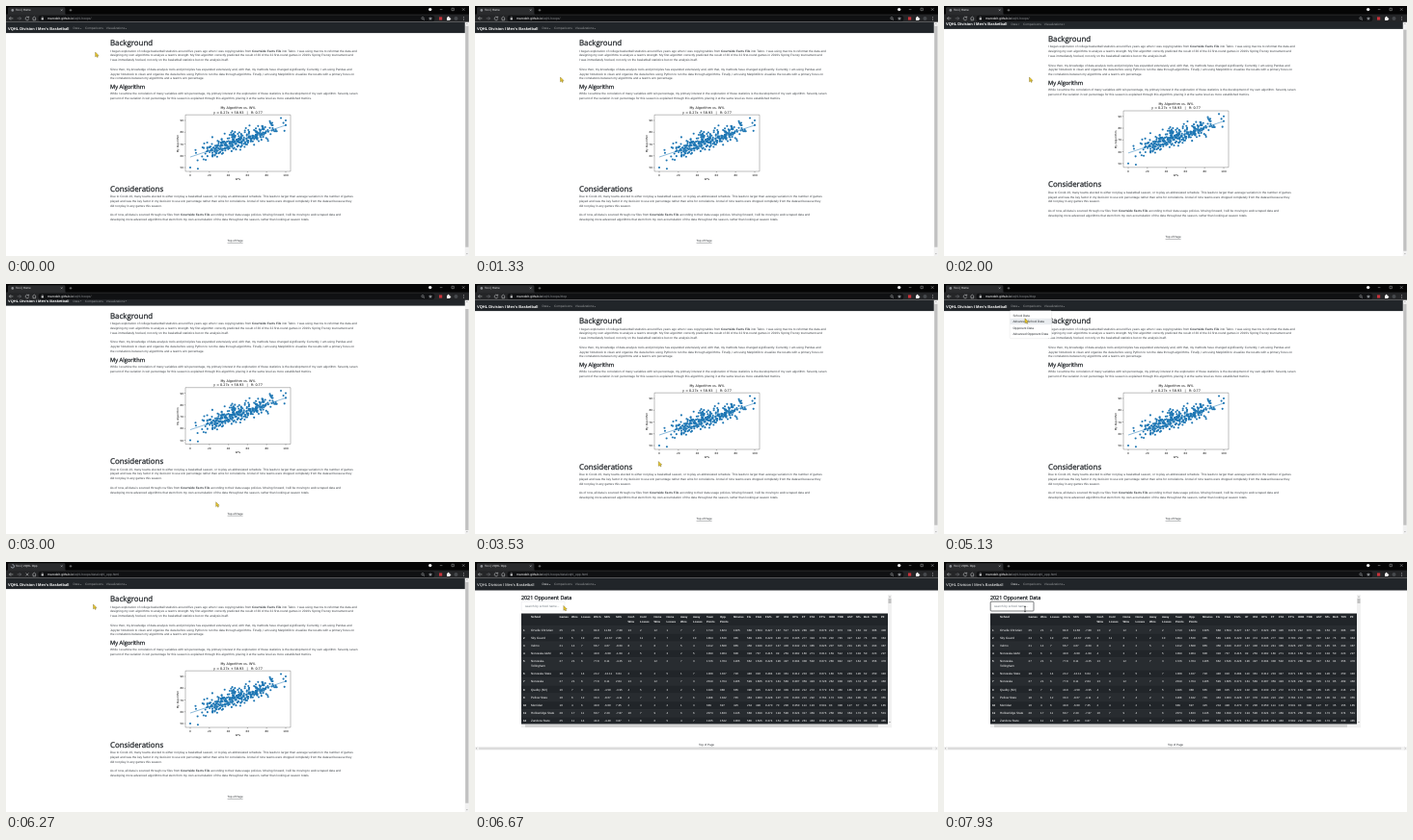
Write an HTML page that moves like this. It is 480 px wide and 260 px high and loops after 8 s.

```html
<!DOCTYPE html>
<html lang="en">
<head>
<meta charset="utf-8">
<title>College basketball statistics</title>
<style>
html, body { margin: 0; width: 100%; height: 100%; overflow: hidden; background: #fff; }
svg { display: block; width: 100vw; height: 100vh; }
text { font-family: "Liberation Sans", Arial, sans-serif; text-rendering: geometricPrecision; white-space: pre; }
.head { font-family: "Open Sans", "Noto Sans", sans-serif; stroke: #212529; stroke-width: .25; }
.plot text { font-family: "DejaVu Sans", sans-serif; }
</style>
</head>
<body>
<svg id="stage" viewBox="0 0 480 260" preserveAspectRatio="none"></svg>
<script>
const LOOP = 8000, INK = '#212529', BODY = '#3a3f44', BLUE = '#1f77b4';

const rect = (x, y, w, h, fill, more = '') =>
  `<rect x="${x}" y="${y}" width="${w}" height="${h}" fill="${fill}" ${more}/>`;
const text = (x, y, size, str, fill = INK, more = '') =>
  `<text x="${x}" y="${y}" font-size="${size}" fill="${fill}" ${more}>${str}</text>`;
const line = (d, color, width = .5, more = '') =>
  `<path d="${d}" fill="none" stroke="${color}" stroke-width="${width}" ${more}/>`;
const triangle = (x, y, r, fill) => `<path d="M${x - r} ${y - r / 2}h${2 * r}l${-r} ${r}z" fill="${fill}"/>`;
const middle = 'text-anchor="middle"', bold = 'font-weight="bold"';

function seeded(seed) {
  return () => (seed = (seed * 16807) % 2147483647) / 2147483647;
}

// ---- Shared page parts

function navbar(height, weight, dataColor) {
  const dim = '#9c9ea0';
  return rect(0, 16.5, 480, height, INK) +
    text(2, 24.6, 4, "VQHL Division I Men's Basketball", '#fff', weight) +
    text(69.5, 24.3, 3.2, 'Data', dataColor || dim) + triangle(77.6, 23.4, .8, dataColor || dim) +
    text(82, 24.3, 3.2, 'Comparisons', dim) +
    text(103.8, 24.3, 3.2, 'Visualizations', dim) + triangle(124.4, 23.4, .8, dim);
}

const topLink = (x, y) => text(x, y, 3, 'Top of Page', INK, middle + ' text-decoration="underline"');

// ---- Home page

const SOURCE = '<tspan font-weight="bold">Courtside Facts File</tspan>';
const PARAGRAPHS = [
  [47.6, `I began exploration of college basketball statistics around five years ago when I was copying tables from ${SOURCE} into Tabro. I was using macros to reformat the data and
designing my own algorithms to analyze a team's strength. My first algorithm correctly predicted the result of 30 of the 32 first-round games in 2019's Spring Frenzy tournament and
I was immediately hooked, not only on the basketball statistics but on the analysis itself.

Since then, my knowledge of data analysis tools and principles has expanded extensively and, with that, my methods have changed significantly. Currently, I am using Pandas and
Jupyter Notebook to clean and organize the data before using Python to run the data through algorithms. Finally, I am using Matplotlib to visualize the results with a primary focus on
the correlations between my algorithms and a team's win percentage.`],
  [92.3, `While I examine the correlation of many variables with win percentage, my primary interest in the exploration of these statistics is the development of my own algorithm. Seventy seven
percent of the variation in win percentage for this season is explained through this algorithm, placing it at the same level as more established metrics.`],
  [199.1, `Due to Covid-19, many teams elected to either not play a basketball season, or to play an abbreviated schedule. This leads to larger than average variation in the number of games
played and was the key factor in my decision to use win percentage rather than wins for correlations. A total of nine teams were dropped completely from the dataset because they
did not play in any games this season.

As of now, all data is sourced through csv files from ${SOURCE} according to their data usage policies. Moving forward, I will be moving to web scraped data and
developing more advanced algorithms that stem from my own accumulation of the data throughout the season, rather than looking at season totals.`],
];

function scatter() {
  const rnd = seeded(4217), normal = () => (rnd() + rnd() + rnd() + rnd() - 2) * 1.73;
  const px = w => 191 + .99 * w, py = v => 168 - 1.225 * (v - 50);
  const fit = w => .27 * w + 58.93;
  const points = [[0, 50], [8, 49], [6, 62.5], [95, 92], [100, 90], [100, 86], [14, 57]];
  while (points.length < 335) {
    const w = 51 + 20 * normal();
    if (w > 5 && w < 99) points.push([w, fit(w) + 3.9 * normal()]);
  }
  let out = points.map(([w, v]) =>
    `<circle cx="${px(w).toFixed(2)}" cy="${py(v).toFixed(2)}" r="1.05" fill="${BLUE}"/>`).join('');
  out += line(`M${px(0)} ${py(fit(0))}L${px(100)} ${py(fit(100))}`, BLUE, .5);
  out += line('M186 113.2h109v58.8h-109z', '#222', .3);
  for (let w = 0; w <= 100; w += 20)
    out += line(`M${px(w)} 172v1.2`, '#000', .3) + text(px(w), 177.2, 2.8, w, '#000', middle);
  for (let v = 50; v <= 90; v += 10)
    out += line(`M186 ${py(v)}h-1.2`, '#000', .3) + text(184, py(v) + 1, 2.8, v, '#000', 'text-anchor="end"');
  out += text(240.5, 107, 3.4, 'My Algorithm vs. W%', '#000', middle) +
    text(240.5, 111.6, 3.4, 'y = 0.27x + 58.93\u00a0\u00a0 |\u00a0\u00a0 R: 0.77', '#000', middle) +
    text(240.5, 181.2, 2.8, 'W%', '#000', middle) +
    text(0, 0, 2.8, 'My Algorithm', '#000', middle + ' transform="translate(178.6 143)rotate(-90)"');
  return `<g class="plot">${out}</g>`;
}

function homePage() {
  const body = PARAGRAPHS.map(([y, block]) =>
    block.split('\n').map((row, i) => text(108, y + 4.8 * i, 3.18, row, BODY)).join('')).join('');
  return navbar(11.6, bold) +
    text(108, 41.2, 7.9, 'Background', INK, 'class="head"') +
    text(108, 86.2, 5.75, 'My Algorithm', INK, 'class="head"') +
    text(108, 192.6, 7.9, 'Considerations', INK, 'class="head"') +
    body + scatter() + topLink(237.6, 245.4);
}

// ---- Table page

const COLUMNS = ('Games,Wins,Losses,W/L%,SRS,SOS,Conf. Wins,Conf. Losses,Home Wins,Home Losses,Away Wins,Away Losses,' +
  'Team Points,Opp. Points,Minutes,FG,FGA,FG%,3P,3PA,3P%,FT,FTA,FT%,ORB,TRB,AST,STL,BLK,TOV,PF').split(',');
const COLUMN_X = [87.5, 100, 110, 123, 134, 146, 158.5, 171, 185.5, 198.5, 213, 226, 240, 254, 268,
  282, 291, 301, 312, 320, 329, 339, 347, 357, 367, 376, 386, 395, 403, 411.5, 421];
const SCHOOLS = [
  ['Orvelle Christian', 21, 4], ['Sky Guard', 5, 19], ['Velmo', 14, 7], ['Norvaska A&amp;M', 6, 9],
  ['Norvaska-/Tollingham', 21, 6], ['Norvaska State', 4, 14], ['Norvaska', 21, 6], ['Quelby (NV)', 7, 9],
  ['Pellow State', 6, 12], ['Merridan', 4, 6], ['Hollowridge State', 17, 11], ['Zandora State', 11, 14],
];

function seasonStats(w, l, rnd) {
  const g = w + l, share = (n, part) => Math.round(n * part);
  const total = perGame => Math.round(g * perGame * (.88 + .24 * rnd()));
  const pair = (rate, tries) => {
    const made = total(rate), shot = total(tries);
    return [made, shot, (made / shot).toFixed(3)];
  };
  return [g, w, l, (100 * w / g).toFixed(1), (40 * (w / g - .55)).toFixed(2), (16 * rnd() - 8).toFixed(2),
    share(w, .6), share(l, .6), share(w, .55), share(l, .35), share(w, .35), share(l, .5),
    total(71), total(68), g * 40 + 25 * share(1, rnd()), ...pair(24, 56), ...pair(6.5, 19.5), ...pair(12.5, 18),
    ...[9.5, 33, 12.5, 6.5, 3.3, 14, 18].map(total)];
}

function schoolTable() {
  const rnd = seeded(991);
  let out = rect(48, 53.5, 380, 115, INK) + text(58, 58.2, 3, 'School', '#fff', bold), y = 66.4;
  COLUMNS.forEach((name, i) => name.split(' ').forEach((word, k) => {
    out += text(COLUMN_X[i], 58.2 + 4.6 * k, 2.8, word, '#fff', bold);
  }));
  SCHOOLS.forEach(([name, w, l], i) => {
    const parts = name.split('/'), h = 8.2 + 4.6 * (parts.length - 1), base = y + 5.1;
    out += rect(48, y, 380, Math.min(h, 168.5 - y), i % 2 ? INK : '#282c30') + rect(48, y, 380, .25, '#373b3e');
    out += text(50, base, 2.9, i + 1, '#fff', bold);
    parts.forEach((part, k) => out += text(58, base + 4.6 * k, 3.1, part, '#fff'));
    seasonStats(w, l, rnd).forEach((v, k) => out += text(COLUMN_X[k], base, 2.95, v, '#fff'));
    y += h;
  });
  return out;
}

function tablePage() {
  const grey = '#777';
  return rect(0, 16.5, 480, 243.5, '#fff') + navbar(13, '', '#e4e5e6') +
    text(48, 38.9, 5.35, '2021 Opponent Data', INK, 'class="head"') +
    `<rect id="field" x="48.2" y="41.2" width="44.8" height="9.8" rx=".8" fill="#fff"/>` +
    text(52, 47.4, 3.2, 'search by school name...', '#6c757d') +
    `<path id="caret" d="M52.4 44.2v4" stroke="#000" stroke-width=".4"/>` +
    schoolTable() +
    rect(428, 34, 4, 134.5, '#f1f1f1') + rect(428.5, 38, 3, 5, '#c1c1c1') +
    triangle(430, 36, -.9, grey) + triangle(430, 166.5, .9, grey) +
    rect(48, 168.7, 384, 3.6, '#f1f1f1') + rect(52, 169.2, 366, 2.6, '#d0d0d0') +
    topLink(240, 191.2) +
    rect(0, 192.2, 480, 3.4, '#f1f1f1') + rect(4, 192.7, 470, 2.4, '#dcdcdc') +
    line('M2.2 193l-1 .9 1 .9M477.6 193l1 .9-1 .9', grey, .4);
}

// ---- Browser frame

function browser() {
  const c = '#d5d6d8';
  return rect(0, 0, 480, 9.2, '#050505') + rect(0, 8.6, 480, 7.9, '#242527') +
    '<path d="M1 9.2q1 0 1-1.6v-5q0-1.4 1.4-1.4h56.6q1.4 0 1.4 1.4v5q0 1.6 1 1.6z" fill="#2a2b2d"/>' +
    `<circle id="icon" cx="6.8" cy="4.4" r="1.3" fill="#8d9095"/>` +
    `<path id="spinner" d="M6.8 2.7a1.7 1.7 0 1 1-1.7 1.7" fill="none" stroke="#c9d3e0" stroke-width=".6"/>` +
    '<text id="tab" x="10" y="5.2" font-size="3" fill="#f0f1f2"></text>' +
    line('M56.8 3.4l1.8 1.8m0-1.8l-1.8 1.8M65.6 4.3h2.8m-1.4-1.4v2.8', c, .4) +
    '<circle cx="439.7" cy="3.6" r="1.7" fill="#f2f2f2"/>' +
    line('M449.8 3.6h2.6M462 2.3h2.4v2.4h-2.4zM473 2.3l2.5 2.5m0-2.5l-2.5 2.5', c, .4) +
    rect(33.5, 9.7, 411, 6.3, '#101113', 'rx="3.1"') +
    line('M7.4 12.9h-4m1.7-1.7l-1.7 1.7 1.7 1.7', c) + line('M11.6 12.9h4m-1.7-1.7l1.7 1.7-1.7 1.7', '#85878a') +
    line('M23.3 11.8a1.8 1.8 0 1 0 .4 1.6M23.7 10.7v1.4h-1.4', c, .5, 'id="reload"') +
    line('M20.6 11.5l2.8 2.8m0-2.8l-2.8 2.8', c, .5, 'id="stop"') +
    line('M27.4 12.8l1.9-1.7 1.9 1.7M28 12.6v2.2h2.6v-2.2', c) +
    rect(36.7, 12.5, 2.2, 1.8, c) + line('M37.1 12.5v-.6a.7 .7 0 0 1 1.4 0v.6', c, .35) +
    '<text x="43" y="14.1" font-size="3.4" fill="#fff">marodelt.github.io<tspan id="path" fill="#8f9296"></tspan></text>' +
    `<circle cx="432" cy="12.7" r="1.2" fill="none" stroke="${c}" stroke-width=".4"/>` + line('M432.9 13.6l1.1 1.1', c) +
    `<path d="M440 10.9l.6 1.4 1.5.1-1.1 1 .3 1.5-1.3-.8-1.3.8.3-1.5-1.1-1 1.5-.1z" fill="#85888c"/>` +
    rect(449, 11.4, 3.2, 3.2, '#c8323a') +
    `<path d="M457 11.8h1a.7 .7 0 1 1 1.3 0h1v1a.7 .7 0 1 1 0 1.3v1h-3.3z" fill="#f0f0f0"/>` +
    '<circle cx="466.5" cy="13" r="2" fill="#46494c"/>' +
    [11.4, 13, 14.6].map(y => `<circle cx="474.5" cy="${y}" r=".45" fill="${c}"/>`).join('');
}

const MENU = ['School Data', 'Advanced School Data', 'Opponent Data', 'Advanced Opponent Data'];
const menu = () => rect(68.2, 27.8, 43.4, 28.8, '#fff', 'rx=".8" stroke="#ccc" stroke-width=".25"') +
  '<rect id="hover" x="68.4" width="43" height="6.4" fill="#e9ecef"/>' +
  MENU.map((item, i) => text(71.4, 33.7 + 6.4 * i, 3.2, item)).join('');

const $ = id => document.getElementById(id);
$('stage').innerHTML = rect(0, 0, 480, 260, '#fff') +
  `<g id="home">${homePage()}</g><g id="table">${tablePage()}</g>` +
  `<g id="bar">${rect(475.75, 16.5, 4.25, 243.5, '#f1f1f1')}<rect id="thumb" x="476.25" width="3.25" height="230" fill="#c1c1c1"/>` +
  triangle(477.9, 18.6, -.8, '#666') + triangle(477.9, 257.8, .8, '#666') + '</g>' +
  `<g id="menu">${menu()}</g>` + browser() +
  '<path id="arrow" d="M0 0V4.9L1.2 3.9 2 5.5 2.8 5.1 2.1 3.5H3.5Z" fill="#ecc92a" stroke="#4a3f08" stroke-width=".3"/>' +
  line('M-1 -2.6h2M0 -2.6v5.2M-1 2.6h2', '#111', .5, 'id="beam"');

// ---- Motion: pointer stops as [time, x, y]

const POINTER = [
  [0, 92.6, 48], [70, 92.6, 48], [870, 82.6, 68.4], [1270, 82.6, 68.4], [1330, 88.5, 74], [2130, 88.5, 74],
  [2330, 122.5, 111.5], [2420, 122.5, 111.5], [3000, 217.5, 226.6], [3130, 236, 240], [3330, 236, 240],
  [4000, 83.5, 55], [4070, 80, 36], [4330, 74, 23.5], [4830, 74, 23.5], [5330, 90.5, 44], [6630, 90.5, 44],
  [6800, 96, 50], [6930, 92, 51.5], [7030, 92, 51.5], [7200, 84, 49], [LOOP, 84, 49],
];

function pointerAt(t) {
  const i = Math.max(1, POINTER.findIndex(stop => stop[0] >= t));
  const [t0, x0, y0] = POINTER[i - 1], [t1, x1, y1] = POINTER[i];
  const k = (t - t0) / (t1 - t0);
  return [x0 + (x1 - x0) * k, y0 + (y1 - y0) * k];
}

const show = (id, on) => $(id).setAttribute('display', on ? 'inline' : 'none');
const set = (id, name, value) => $(id).setAttribute(name, value);

function draw(t) {
  const loaded = t >= 6330, loading = t >= 5530 && !loaded, open = t >= 4670 && t < 5530;
  const scroll = t > 1930 && t < 3270 ? 5.5 * (1 - Math.exp((1900 - t) / 70)) : 0;
  const [x, y] = pointerAt(t), typing = t >= 7180, focus = t >= 7400;

  show('home', !loaded);
  show('table', loaded);
  show('bar', !loaded);
  set('home', 'transform', `translate(0 ${-scroll})`);
  set('thumb', 'y', 20.75 + scroll * .95);

  show('menu', open);
  const row = Math.floor((y - 29.2) / 6.4);
  show('hover', open && row >= 0);
  set('hover', 'y', 29.4 + 6.4 * row);

  show('spinner', loading);
  show('icon', !loading);
  show('stop', loading);
  show('reload', !loading);
  set('spinner', 'transform', `rotate(${t * .4} 6.8 4.4)`);
  $('tab').textContent = t < 5870 ? 'Tovi | Home' : 'Tovi | VQHL Opp';
  $('path').textContent = '/vqhl-hoops/' + (t < 3270 ? '' : t < 5530 ? '#top' : 'data/vqhl_opp.html');

  set('field', 'stroke', focus ? '#212529' : '#ced4da');
  set('field', 'stroke-width', focus ? .6 : .3);
  show('caret', focus && t < 7930);

  show('arrow', !typing);
  show('beam', typing);
  set(typing ? 'beam' : 'arrow', 'transform', `translate(${x} ${y})`);
}

const start = performance.now();
function tick() {
  draw((performance.now() - start) % LOOP);
  requestAnimationFrame(tick);
}
tick();
</script>
</body>
</html>
```
